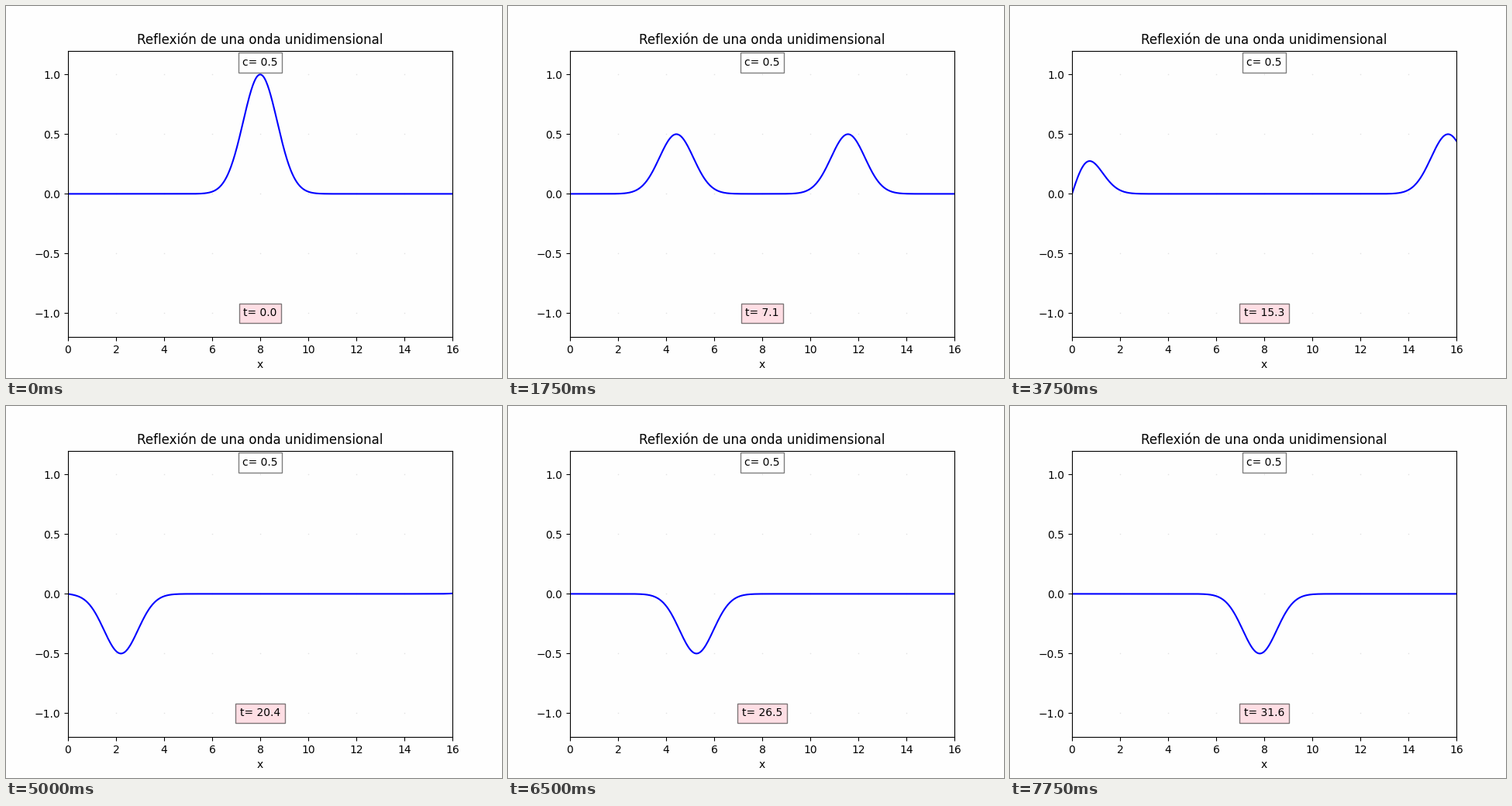
A matplotlib script that plays this animation: 640 px wide and 480 px high, repeating every 8000 ms.

```python
import numpy as np
import matplotlib.pyplot as plt
from matplotlib.animation import FuncAnimation

FRAMES, INTERVAL = 32, 250
SPEED = 0.5
CENTER = 8
TIME_STEP = 50 / 49
PAPER = "#fefefe"

x = np.linspace(0, 16, 800)


def pulse(s):
    return 0.5 * np.exp(-(s - CENTER) ** 2)


def wave(t):
    """Fixed end at x = 0 (inverted echo), open end at x = 16."""
    d = SPEED * t
    return pulse(x - d) + pulse(x + d) - pulse(d - x)


def label(y, text, color):
    return ax.text(CENTER, y, text, ha="center", va="center", zorder=5,
                   bbox=dict(facecolor=color, alpha=0.5))


plt.rcParams["font.family"] = "DejaVu Sans"
fig, ax = plt.subplots(figsize=(6.4, 4.8), dpi=100, facecolor=PAPER)
ax.set_facecolor(PAPER)
ax.set(xlim=(0, 16), ylim=(-1.2, 1.2), xlabel="x",
       title="Reflexión de una onda unidimensional")
ax.set_xticks(range(0, 17, 2))
ax.set_yticks(np.arange(-1, 1.1, 0.5))

# faint dots where the grid lines would cross
gx, gy = np.meshgrid(np.arange(2, 16, 2), np.arange(-1, 1.1, 0.5))
ax.plot(gx.ravel(), gy.ravel(), "s", ms=1, mew=0, color="#e2e2e2", zorder=1)

line, = ax.plot(x, wave(0), "b", lw=1.5)
label(1.1, f"c= {SPEED}", "white")
clock = label(-1, "t= 0.0", "pink")


def update(i):
    t = i * TIME_STEP
    line.set_ydata(wave(t))
    clock.set_text(f"t= {t:.1f}")
    return line, clock


anim = FuncAnimation(fig, update, frames=FRAMES, interval=INTERVAL,
                     repeat=True, repeat_delay=0)
plt.show()
```
